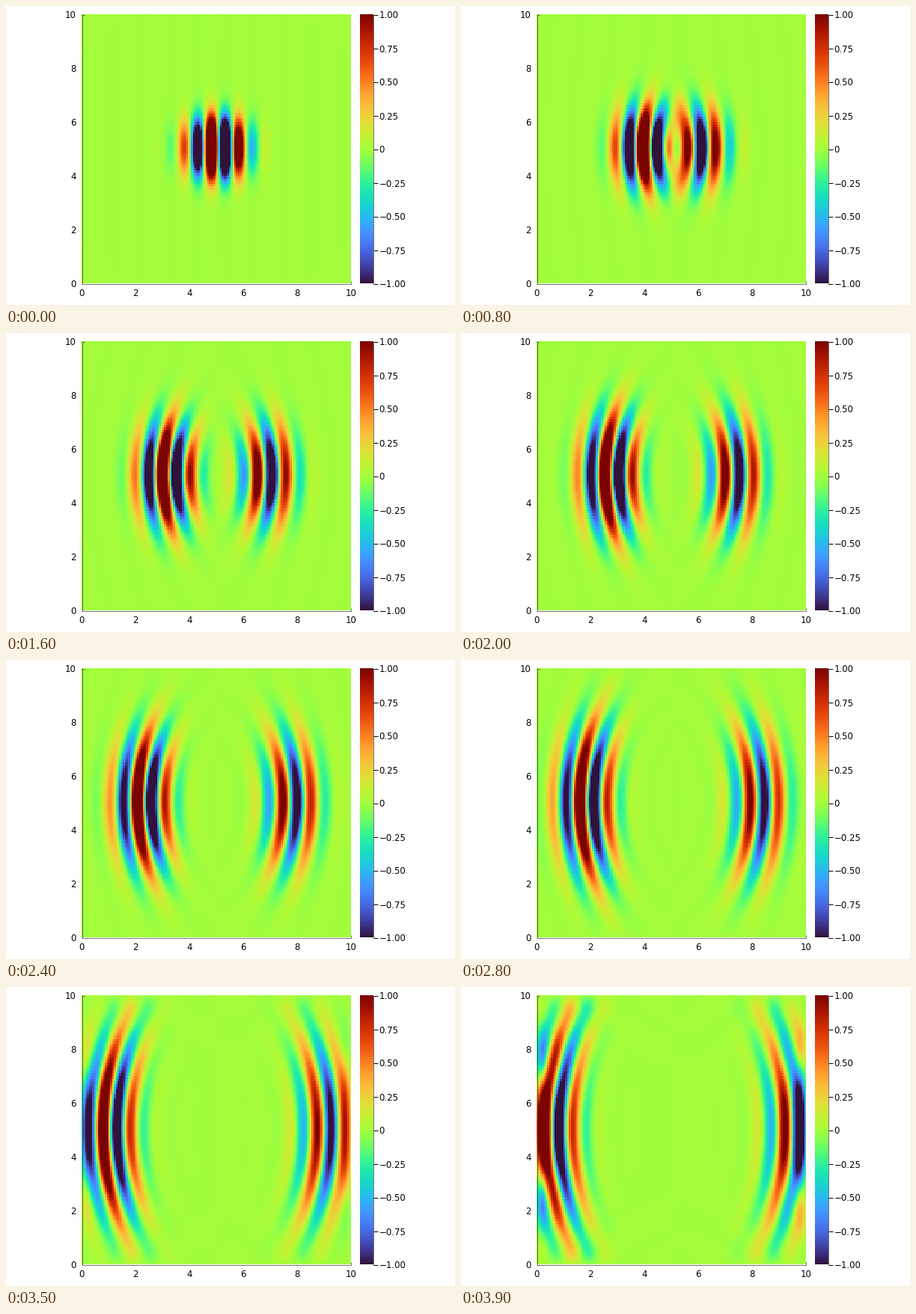
A matplotlib script that plays this animation: 600x400 px, repeating every 4 s.

```python
import numpy as np
import matplotlib.pyplot as plt
from matplotlib.animation import FuncAnimation

W, H, DPI = 600, 400, 100
FRAMES, INTERVAL = 40, 100

# Wave packet on a grid whose cells are taller than wide
NX, NY, SIZE = 150, 100, 10.0
STEP = 0.1157         # distance a wave travels along x per frame
K = 6.0               # carrier wavenumber
KICK = 5.0            # strength of the initial velocity


def axis_modes(n):
    """Offsets from the centre, sine modes and squared lattice frequencies."""
    k = np.arange(1, n + 1)
    modes = np.sin(np.pi * np.outer(k, k) / (n + 1))
    return (k - 1) * SIZE / n - SIZE / 2, modes, 4 * np.sin(np.pi * k / (2 * n + 2)) ** 2


x, modes_x, freq_x = axis_modes(NX)
y, modes_y, freq_y = axis_modes(NY)
X, Y = np.meshgrid(x, y)

# The same coupling per cell both ways makes waves faster along y
omega = NX / SIZE * np.sqrt(freq_y[:, None] + freq_x)
envelope = np.exp(-X**2 - Y**2)


def spectrum(u):
    return 4 / ((NX + 1) * (NY + 1)) * modes_y @ u @ modes_x


start = spectrum(envelope * np.cos(K * X))
speed = spectrum(-KICK * K * envelope * np.sin(K * X)) / omega


def field(frame):
    phase = omega * STEP * (frame + 1)
    return modes_y @ (start * np.cos(phase) + speed * np.sin(phase)) @ modes_x


# Layout in pixels, y pointing down
LEFT, RIGHT, TOP, BOTTOM = 101, 461, 11.5, 371.5
BAR_LEFT, BAR_RIGHT = 473, 491
UNIT = (RIGHT - LEFT) / SIZE
FONT = dict(family="DejaVu Sans", fontsize=8.5, color="black")

fig = plt.figure(figsize=(W / DPI, H / DPI), dpi=DPI, facecolor="white")
ax = fig.add_axes([0, 0, 1, 1])
ax.axis("off")


def line(x0, y0, x1, y1, alpha=0.55):
    ax.plot([x0, x1], [y0, y1], color="black", lw=0.7, alpha=alpha,
            solid_capstyle="butt")


def label(x, y, text, ha):
    ax.text(x, y, text, ha=ha, va="center_baseline", **FONT)


def heat(data, extent):
    return ax.imshow(data, extent=extent, origin="lower", cmap="turbo",
                     vmin=-1, vmax=1, interpolation="nearest", aspect="auto")


image = heat(field(0), (LEFT, RIGHT, BOTTOM, TOP))
heat(np.linspace(-1, 1, 256)[:, None], (BAR_LEFT, BAR_RIGHT, BOTTOM, TOP))

# The field hides all ticks but the outermost ones
line(LEFT + 0.5, TOP, LEFT + 0.5, BOTTOM)
line(LEFT, BOTTOM, RIGHT, BOTTOM)
line(LEFT, TOP, LEFT + 4, TOP)
line(RIGHT, BOTTOM, RIGHT, BOTTOM - 4)
for value in range(0, 11, 2):
    label(LEFT + UNIT * value, 382.7, str(value), "center")
    label(93.5, BOTTOM - UNIT * value, str(value), "right")

line(BAR_RIGHT, TOP, BAR_RIGHT, BOTTOM)
for i in range(-4, 5):
    tick = (TOP + BOTTOM) / 2 - (BOTTOM - TOP) / 8 * i
    text = f"{i / 4:.2f}".replace("-", "\u2212") if i else "0"
    line(BAR_RIGHT, tick, BAR_RIGHT + 6, tick, alpha=1)
    label(498.5, tick, text, "left")

ax.set_xlim(0, W)
ax.set_ylim(H, 0)


def update(frame):
    image.set_data(field(frame))
    return [image]


anim = FuncAnimation(fig, update, frames=FRAMES, interval=INTERVAL,
                     repeat=True, repeat_delay=0, blit=False)
plt.show()
```
